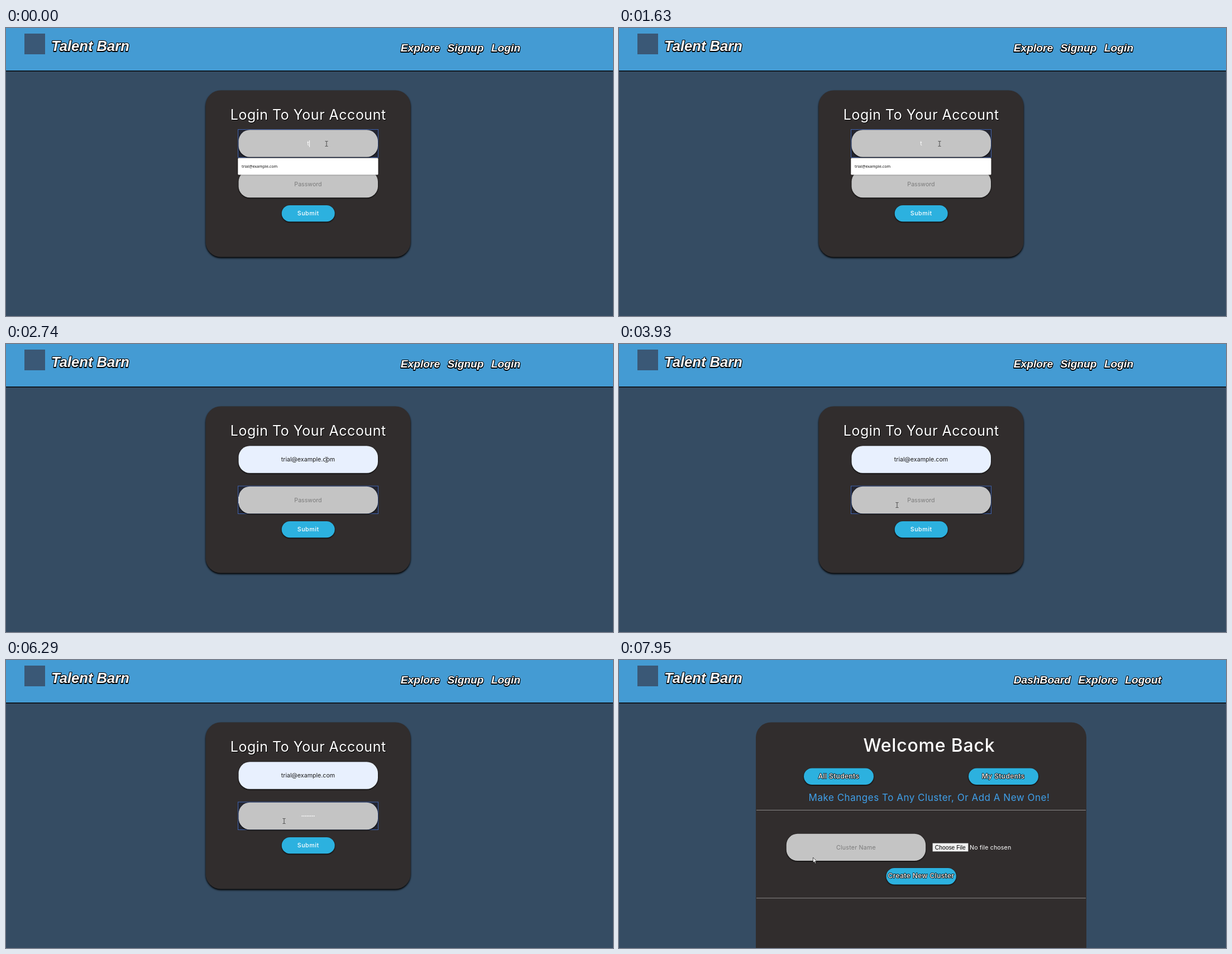
Recreate the animation shown at these times as an HTML page. Size 1087 by 515 pixels, loop 8000 ms.

```html
<!DOCTYPE html>
<html lang="en">
<head>
<meta charset="utf-8">
<title>Login demo</title>
<style>
  html, body { margin: 0; width: 100%; height: 100%; overflow: hidden; background: #354c63; }
  svg { display: block; width: 1087px; height: 515px; }
  text { font-family: Montserrat, Inter, sans-serif; font-optical-sizing: none; white-space: pre; }
  .mid { text-anchor: middle; }
  .nav text, .brand {
    font-family: "Liberation Sans", Arial, sans-serif; font-weight: bold; font-style: italic;
    font-size: 19.2px; fill: #fff;
  }
  .brand { font-size: 25.6px; }
  .nav text, .brand, .btn { paint-order: stroke; stroke: #000; stroke-width: 2px; stroke-linejoin: round; }
  .nav text, .brand { filter: drop-shadow(.6px 1px .4px #000); }
  .card { fill: #312d2d; }
  .raised { filter: drop-shadow(0 2px 1.5px #000); }
  .field { fill: #c4c4c4; filter: drop-shadow(0 1px 1px #000); }
  .blue { fill: #2cb1df; filter: drop-shadow(0 1px .8px #000); }
  .ring { fill: rgba(22, 30, 54, .45); stroke: #3f62ad; stroke-width: 1; }
  .heading { font-size: 25px; letter-spacing: .5px; fill: #fff; filter: drop-shadow(1px 1.4px .6px #000); }
  .small { font-size: 10.67px; }
  .hint { fill: #7b7b7b; }
  .btn { font-size: 12px; font-weight: 500; letter-spacing: .4px; fill: #fff; stroke-width: 1.6px; }
  .sans { font-family: "Liberation Sans", Arial, sans-serif; }
  .caret { stroke: #fff; stroke-width: 1; }
</style>
</head>
<body>
<svg viewBox="0 0 1087 515" xmlns="http://www.w3.org/2000/svg">
  <rect width="1087" height="515" fill="#354c63"/>
  <rect width="1087" height="76.5" fill="#449bd3"/>
  <rect y="76" width="1087" height="1.7" fill="#0b1016"/>
  <rect x="33" y="10" width="37" height="37" fill="#3a5876"/>
  <text class="brand" x="81" y="41">Talent Barn</text>

  <g id="login">
    <g class="nav">
      <text x="706.7" y="42">Explore</text>
      <text x="790.5" y="42">Signup</text>
      <text x="868.9" y="42">Login</text>
    </g>
    <rect class="card raised" x="357.5" y="111.5" width="367" height="298" rx="27"/>
    <text class="heading mid" x="541.2" y="163.5">Login To Your Account</text>

    <rect class="ring" id="emailRing" x="415.5" y="181.5" width="251" height="50"/>
    <rect class="field" id="email" x="416.5" y="182.3" width="249.5" height="48.4" rx="20"/>
    <text class="mid" id="emailText" x="541" y="210.3"></text>
    <path class="caret" id="emailCaret" d="M543.5 201V213"/>

    <rect class="ring" id="passRing" x="415.5" y="254" width="251" height="49.5"/>
    <rect class="field" x="416.5" y="254.8" width="249.5" height="48.4" rx="20"/>
    <text class="small hint mid" id="passHint" x="541" y="282.8">Password</text>
    <g id="dots" fill="#fff"></g>
    <path class="caret" id="passCaret" d="M0 273V285"/>

    <rect class="ring" id="submitRing" x="492.5" y="316" width="97" height="31" style="stroke:#4a6c9c"/>
    <rect class="blue" x="493.7" y="317" width="95" height="29.3" rx="14.6"/>
    <text class="small mid" x="541.2" y="335" fill="#fff" font-weight="500" letter-spacing=".55">Submit</text>

    <g id="menu">
      <rect x="415.3" y="232.5" width="251.2" height="30" rx="1.5" fill="#fff"
            style="filter:drop-shadow(0 .8px .8px rgba(0,0,0,.6))"/>
      <rect id="menuRow" x="415.5" y="237.3" width="250.8" height="20.6" fill="#c8c8c8"/>
      <text id="menuText" x="422" y="250.2" fill="#111" style="font:7.1px 'Noto Sans',sans-serif"></text>
    </g>
  </g>

  <g id="dash">
    <g class="nav">
      <text x="706.7" y="42">DashBoard</text>
      <text x="822.5" y="42">Explore</text>
      <text x="906.2" y="42">Logout</text>
    </g>
    <rect class="card" x="245" y="111.5" width="592" height="460" rx="27"/>
    <text class="mid" x="555.5" y="164" fill="#fff" font-size="32" font-weight="500" letter-spacing=".8">Welcome Back</text>
    <rect class="blue" x="331" y="193.5" width="125" height="29.5" rx="14.7"/>
    <text class="btn mid" x="393.5" y="211.5">All Students</text>
    <rect class="blue" x="626" y="193.5" width="125" height="29.5" rx="14.7"/>
    <text class="btn mid" x="688.2" y="211.5">My Students</text>
    <text class="mid" x="555.5" y="252" fill="#3fa0ea" font-size="17" letter-spacing=".52">Make Changes To Any Cluster, Or Add A New One!</text>
    <path d="M246 268.5H836M246 425.8H836" stroke="#8b8989"/>
    <rect class="field" x="299.7" y="310.8" width="249.5" height="48.2" rx="20"/>
    <text class="small hint mid" x="424.5" y="338.7" letter-spacing=".2">Cluster Name</text>
    <rect x="561.5" y="327.5" width="64" height="15" rx="1" fill="#f0f0f0" stroke="#777"/>
    <text class="sans" x="565.8" y="338.6" font-size="10.3" fill="#000">Choose File</text>
    <text class="small" x="628" y="338.7" fill="#fff" letter-spacing=".12">No file chosen</text>
    <rect class="blue" x="478.5" y="372" width="125.3" height="29.5" rx="14.7"/>
    <text class="btn mid" x="541" y="389.8">Create New Cluster</text>
  </g>

  <g id="cursor">
    <path id="beam" d="M-2.5-4.5H-.8L0-4L.8-4.5H2.5M0-4V4M-2.5 4.5H-.8L0 4L.8 4.5H2.5" fill="none" stroke="#3c3c3c" stroke-width=".9"/>
    <path id="arrow" d="M0 0V9.6L2.2 7.6L3.7 11L5.2 10.3L3.7 7.1H6.6Z" fill="#fff" stroke="#111" stroke-width=".7"/>
    <path id="hand" d="M-.8 0Q0-.8 .8 0V3.8L5 5V8.4L4 11H-1.2L-3.6 7.2Q-3.4 5.6-.8 7.2Z" fill="#fff" stroke="#111" stroke-width=".7"/>
  </g>
</svg>
<script>
const LOOP = 8000;
const ADDRESS = "trial@example.com";
const DOT_STEP = 3.05;
const keyTimes = [4330, 4450, 4730, 4880, 5190, 5460, 5600, 5730];
// time, x, y, shape
const moves = [
  [0, 574, 207, "beam"],
  [3330, 567, 195, "beam"],
  [3480, 551, 214, "beam"],
  [3630, 530, 240, "arrow"],
  [3780, 510, 272, "beam"],
  [3930, 498, 288, "beam"],
  [6440, 504, 294, "beam"],
  [6590, 520, 318, "hand"],
  [6740, 538, 335, "hand"],
  [6880, 548, 339.5, "hand"],
  [7280, 478, 348, "arrow"],
  [7410, 392, 352, "arrow"],
  [7550, 347.5, 353, "arrow"]
];

const el = id => document.getElementById(id);
const show = (id, on) => { el(id).style.display = on ? "" : "none"; };
const within = (t, from, to) => t >= from && t < to;

el("menuText").textContent = ADDRESS;

function drawEmail(t) {
  const filled = t >= 2490, preview = within(t, 2490, 2740);
  const text = el("emailText");
  text.textContent = filled ? ADDRESS : "t";
  text.setAttribute("class", preview ? "mid sans" : "mid small");
  text.style.fontSize = preview ? "7.6px" : "";
  text.style.fill = filled ? "#1c1c1c" : "#fff";
  el("email").style.fill = filled ? "#e8f0fe" : "";
  show("emailRing", t < 2740);
  show("emailCaret", t < 430 || within(t, 960, 1510) || within(t, 1750, 2340));
  show("menu", t < 960 || within(t, 1510, 2740));
  show("menuRow", t >= 2340);
}

function drawPassword(t) {
  const n = keyTimes.filter(k => t >= k).length;
  const left = 541 - n * DOT_STEP / 2;
  let dots = "";
  for (let i = 0; i < n; i++) {
    dots += `<circle cx="${left + (i + .5) * DOT_STEP}" cy="279" r=".95"/>`;
  }
  el("dots").innerHTML = dots;
  show("passHint", n === 0);
  show("passRing", within(t, 2740, 7010));
  show("passCaret", within(t, 2740, 3330) || within(t, 4330, 6290));
  const caretX = n ? Math.round(left + n * DOT_STEP) + .5 : 417;
  el("passCaret").setAttribute("transform", `translate(${caretX} 0)`);
}

function drawCursor(t) {
  const [, x, y, shape] = moves.filter(m => t >= m[0]).pop();
  el("cursor").setAttribute("transform", `translate(${x} ${y})`);
  for (const id of ["beam", "arrow", "hand"]) show(id, id === shape);
}

function draw(t) {
  const loggedIn = t >= 7950;
  show("login", !loggedIn);
  show("dash", loggedIn);
  show("submitRing", t >= 7010);
  drawEmail(t);
  drawPassword(t);
  drawCursor(t);
}

const start = performance.now();
function tick() {
  draw((performance.now() - start) % LOOP);
  requestAnimationFrame(tick);
}
tick();
</script>
</body>
</html>
```
